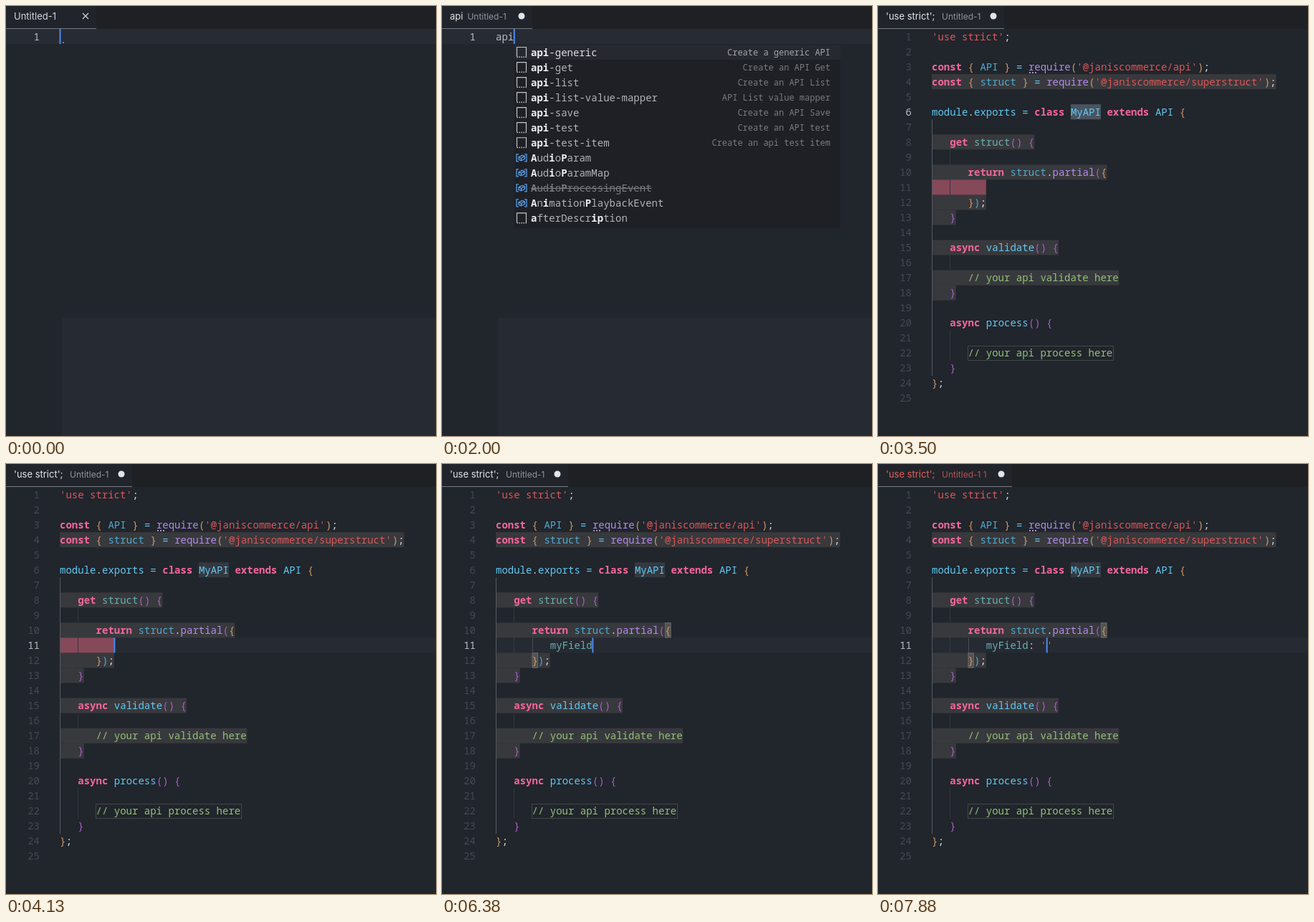
An HTML page with a canvas that plays this animation: 600x600 px, repeating every 8000 ms.

```html
<!DOCTYPE html>
<html lang="en">
<head>
<meta charset="utf-8">
<title>Snippet editor</title>
<style>
  html, body { margin: 0; width: 100%; height: 100%; overflow: hidden; background: #21252c; }
  canvas { display: block; width: 600px; height: 600px; }
</style>
</head>
<body>
<canvas id="stage" width="600" height="600"></canvas>
<script>
const ctx = document.getElementById('stage').getContext('2d');
const LOOP = 8000, LEFT = 75, CHAR = 8.43, ROW = 21.04, TOP = 32;
const MONO = '"Noto Sans Mono", "DejaVu Sans Mono", monospace';
const UI = 'Inter, Roboto, sans-serif';

const APPEAR = 1000, ACCEPT = 2130, NEXT_STOP = 3750, ERROR = 7750;
const PREFIX_KEYS = [630, 750, 880];
const FIELD = "myField: '";
const FIELD_KEYS = [4880, 5000, 5500, 5750, 5880, 6130, 6250, 6880, 7130, 7630];

const COLORS = {
  p: '#f5679b', s: '#dc5657', w: '#d9dde3', b: '#60c9f3', c: '#4fa9cf',
  f: '#b18bea', o: '#cf9868', v: '#a95fc5', t: '#68b0ad', g: '#94c078'
};

// Each § is followed by a colour key.
const CODE = [
  "§s'use strict'§w;",
  "",
  "§pconst §o{ §cAPI §o} §b= §frequire§o(§s'@janiscommerce/api'§o)§w;",
  "§pconst §o{ §cstruct §o} §b= §frequire§o(§s'@janiscommerce/superstruct'§o)§w;",
  "",
  "§bmodule§w.§bexports = §pclass §bMyAPI §pextends §bAPI §o{",
  "",
  "   §pget §tstruct§v() {",
  "",
  "      §preturn §cstruct§w.§fpartial§v(§o{",
  "",
  "      §o}§c)§w;",
  "   §v}",
  "",
  "   §pasync §bvalidate§v() {",
  "",
  "      §g// your api validate here",
  "   §v}",
  "",
  "   §pasync §bprocess§v() {",
  "",
  "      §g// your api process here",
  "   §v}",
  "§o}§w;",
  ""
];

const SUGGESTIONS = [
  ['api-generic', 'Create a generic API'], ['api-get', 'Create an API Get'],
  ['api-list', 'Create an API List'], ['api-list-value-mapper', 'API List value mapper'],
  ['api-save', 'Create an API Save'], ['api-test', 'Create an API test'],
  ['api-test-item', 'Create an api test item'], ['AudioParam'], ['AudioParamMap'],
  ['AudioProcessingEvent'], ['AnimationPlaybackEvent'], ['afterDescription', '']
];

const colX = col => LEFT + col * CHAR;
const rowY = line => TOP + (line - 1) * ROW;
const countPast = (keys, t) => keys.filter(k => t >= k).length;

function rect(x, y, w, h, color) {
  ctx.fillStyle = color;
  ctx.fillRect(x, y, w, h);
}

function frame(x, y, w, h, color) {
  ctx.strokeStyle = color;
  ctx.lineWidth = 1;
  ctx.strokeRect(x + .5, y + .5, w - 1, h - 1);
}

function text(str, x, y, color, font, align = 'left') {
  ctx.font = font;
  ctx.fillStyle = color;
  ctx.textAlign = align;
  ctx.fillText(str, x, y);
}

const mono = (str, x, y, color, weight = 500) => text(str, x, y, color, `${weight} 14px ${MONO}`);

function codeLine(source, line, startCol = 0) {
  let col = startCol, key = 'w';
  source.split('§').forEach((part, i) => {
    if (i) { key = part[0]; part = part.slice(1); }
    const lead = part.length - part.trimStart().length;
    mono(part.trim(), colX(col + lead), rowY(line) + 15.5, COLORS[key], key === 'p' ? 700 : 500);
    col += part.length;
  });
}

function span(line, from, to, color) {
  rect(colX(from), rowY(line), (to - from) * CHAR, ROW, color);
}

function lineNumber(n, active) {
  text(n, 47, rowY(n) + 15.5, active ? '#b9bec7' : '#434955', `500 14px ${MONO}`, 'right');
}

function cursor(line, col, elapsed) {
  const phase = elapsed % 1000;
  const alpha = phase < 500 ? Math.min(1, (500 - phase) / 120) : Math.max(0, (phase - 880) / 120);
  ctx.globalAlpha = alpha;
  rect(colX(col) - .5, rowY(line), 2, ROW, '#4a8cf0');
  ctx.globalAlpha = 1;
}

function tab(t, typed) {
  rect(0, 0, 600, TOP, '#1e2024');
  const inserted = t >= ACCEPT, error = t >= ERROR;
  const width = error ? 187 : inserted ? 176 : 126;
  rect(0, 0, width, 31, '#21242a');
  rect(0, 31, width, 1, '#747981');
  if (!typed && !inserted) {
    text('Untitled-1', 11, 18.5, '#d5d8de', `400 13px ${UI}`);
    ctx.strokeStyle = '#d0d3d8';
    ctx.lineWidth = 1.2;
    ctx.beginPath();
    ctx.moveTo(107, 10); ctx.lineTo(115, 18);
    ctx.moveTo(115, 10); ctx.lineTo(107, 18);
    ctx.stroke();
    return;
  }
  const title = inserted ? "'use strict';" : 'api'.slice(0, typed);
  text(title, 11, 18.5, error ? '#e45e58' : '#e4e6ea', `400 13px ${UI}`);
  const noteX = inserted ? 89 : 11 + ctx.measureText(title).width + 6;
  text(error ? 'Untitled-1 1' : 'Untitled-1', noteX, 18.5, error ? '#b55452' : '#90959d', `400 12px ${UI}`);
  ctx.fillStyle = '#e2e4e8';
  ctx.beginPath();
  ctx.arc(width - 15, 14, 4.5, 0, 7);
  ctx.fill();
}

function snippetIcon(x, y) {
  ctx.strokeStyle = '#c3c5c9';
  ctx.lineWidth = 1.2;
  ctx.beginPath();
  ctx.moveTo(x, y + 13); ctx.lineTo(x, y); ctx.lineTo(x + 13, y); ctx.lineTo(x + 13, y + 13);
  ctx.stroke();
  for (let i = 0; i < 5; i++) rect(x + i * 3, y + 13, 1.5, 1.5, '#c3c5c9');
}

function variableIcon(x, y) {
  ctx.strokeStyle = '#5d9fe6';
  ctx.lineWidth = 1.3;
  ctx.stroke(new Path2D(`M${x + 3} ${y + 2}h-3v10h3M${x + 11} ${y + 2}h3v10h-3
    M${x + 3} ${y + 6}l5-2.5 3.5 1.5v3.5l-5 2.5-3.5-1.5zl3.5 1.5 5-2.5M${x + 6.5} ${y + 7.5}v3`));
}

function suggestions() {
  rect(101, 54, 455, 256, '#1e2025');
  rect(101, 54, 455, 21, '#262a30');
  SUGGESTIONS.forEach(([name, detail], i) => {
    const mid = 64.5 + i * ROW, base = mid + 5;
    const struck = name === 'AudioProcessingEvent';
    if (detail === undefined) variableIcon(104, mid - 7);
    else snippetIcon(104.5, mid - 7);
    let pattern = name.startsWith('api') ? 'api' : 'aip';
    [...name].forEach((ch, j) => {
      const hit = ch.toLowerCase() === pattern[0];
      if (hit) pattern = pattern.slice(1);
      const plain = i ? '#b0b3b8' : '#dcdee2';
      mono(ch, 124 + j * CHAR, base, struck ? '#777a80' : hit ? '#eceef1' : plain, hit ? 700 : 500);
    });
    if (struck) rect(124, mid, name.length * CHAR, 1.2, '#777a80');
    if (detail) text(detail, 542, mid + 4.5, i ? '#777b82' : '#a2a5ab', `500 12px ${MONO}`, 'right');
  });
}

function emptyFile(t, typed) {
  rect(78, 435, 522, 165, '#262b33');
  rect(0, TOP, 600, ROW, '#272b34');
  lineNumber(1, true);
  if (!typed) rect(79, 50, 2, 2, '#7d78a8');
  mono('api'.slice(0, typed), LEFT, rowY(1) + 15.5, '#b9bdc5');
  cursor(1, typed, typed ? t - PREFIX_KEYS[typed - 1] : t + 250);
  if (t >= APPEAR) suggestions();
}

function guide(col, from, to, color) {
  rect(Math.round(colX(col)), rowY(from), 1, (to - from + 1) * ROW, color);
}

function snippetFile(t) {
  const typed = countPast(FIELD_KEYS, t);
  const onField = t >= NEXT_STOP;
  const activeLine = onField ? 11 : 6;
  const gray = '#38393d';

  if (onField) rect(LEFT, rowY(11), 525, ROW, '#262a32');
  [[4, 57], [8, 17], [10, 29], [12, 9], [13, 4], [15, 21], [17, 31], [18, 4]]
    .forEach(([line, end]) => span(line, 0, end, gray));
  span(6, 23, 28, onField ? '#343940' : '#4a5460');
  if (!typed) span(11, 0, 9, '#86495a');
  frame(125, Math.round(rowY(22)), 204, 21, '#43484a');

  guide(0, 7, 23, '#555a62');
  [[9, 12], [16, 17], [21, 22]].forEach(([from, to]) => guide(3, from, to, '#343941'));
  if (typed) {
    guide(6, 11, 11, '#4a4f57');
    [[10, 28], [12, 6]].forEach(([line, col]) => {
      span(line, col, col + 1, '#53534f');
      frame(colX(col), rowY(line), CHAR, ROW, '#66666a');
    });
  }

  CODE.forEach((source, i) => {
    lineNumber(i + 1, i + 1 === activeLine);
    codeLine(source, i + 1);
  });
  for (let i = 0; i < 3; i++) rect(211 + i * 4, 92, 2, 2, '#9a9da5');

  if (typed) {
    const entry = FIELD.slice(0, typed);
    codeLine('§t' + entry.slice(0, 7) + '§w' + entry.slice(7, 9), 11, 9);
    if (typed === FIELD.length) codeLine("§s''", 11, 18);
  }
  if (onField) cursor(11, 9 + typed, t - (typed ? FIELD_KEYS[typed - 1] : NEXT_STOP));
}

function draw() {
  const t = performance.now() % LOOP;
  const typed = countPast(PREFIX_KEYS, t);
  rect(0, 0, 600, 600, '#21252c');
  if (t < ACCEPT) emptyFile(t, typed);
  else snippetFile(t);
  tab(t, typed);
  requestAnimationFrame(draw);
}
draw();
</script>
</body>
</html>
```
